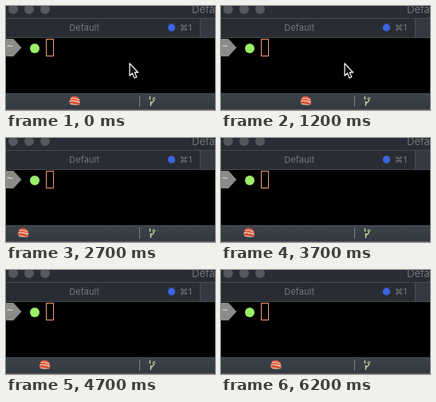
An HTML page that plays this animation: 262 by 130 pixels, repeating every 6.4 s.

```html
<!DOCTYPE html>
<html lang="en">
<head>
<meta charset="utf-8">
<title>Terminal status bar</title>
<style>
  html, body { margin: 0; width: 262px; height: 130px; overflow: hidden; background: #000; }
  svg { display: block; }
  text { font-family: Inter, "DejaVu Sans", sans-serif; font-size: 11px; fill: #74777b; }
</style>
</head>
<body>
<svg width="262" height="130" viewBox="0 0 262 130">
  <defs>
    <linearGradient id="bar" x2="0" y2="1">
      <stop stop-color="#3d434b"/>
      <stop offset="1" stop-color="#32383f"/>
    </linearGradient>
  </defs>

  <!-- title bar and tabs -->
  <rect width="262" height="15" fill="#272c35"/>
  <g fill="#55585d">
    <circle cx="9" cy="4" r="6"/>
    <circle cx="29" cy="4" r="6"/>
    <circle cx="49" cy="4" r="6"/>
  </g>
  <text x="233" y="9" style="font-size:13px">Defa</text>
  <rect y="15" width="262" height="25" fill="#292c32"/>
  <rect x="244" y="15" width="18" height="25" fill="#343941"/>
  <path d="M0 15.5H262M0 39.5H262" stroke="#464a50"/>
  <path d="M243.5 16V39" stroke="#4a4e54"/>
  <text x="79.2" y="31" letter-spacing=".1">Default</text>
  <circle cx="207.5" cy="27" r="4.7" fill="#3b64df"/>
  <text x="217.5" y="31">⌘1</text>

  <!-- prompt -->
  <path d="M0 41H9.3L19.5 52 9.3 63H0Z" fill="#8b8b8b"/>
  <text x="1" y="54" style="font:13px 'DejaVu Sans Mono',monospace;fill:#e2e2e2">~</text>
  <circle cx="36" cy="53" r="6" fill="#9bee68"/>
  <rect x="50.5" y="41.5" width="9" height="21" fill="none" stroke="#f39c72"/>
  <path id="pointer" d="M155 71.7V87.2L158.4 84 161 90 163.8 88.8 161.3 83H165.6Z"
        fill="#080808" stroke="#eee" stroke-width="1.3" stroke-linejoin="round"/>

  <!-- status bar -->
  <rect y="109" width="262" height="21" fill="url(#bar)"/>
  <path d="M0 109.5H262" stroke="#474d54"/>
  <path d="M0 129.5H262" stroke="#665b61"/>
  <path d="M167.5 112V126" stroke="#7b8087"/>
  <g fill="none" stroke="#c3dfa0" stroke-width="1.4">
    <path d="M180.5 113V117M181.5 119V125M181.5 121.5Q185.5 120.5 185.5 116"/>
    <path d="M183.5 116.5L185.5 114 187.3 116.5" stroke-width="1"/>
  </g>
  <!-- two slices over rice, rising to the right -->
  <g id="sushi">
    <path d="M.6 6.5L13 7.5Q14.6 9.5 13 11.2Q7.5 12.5 2 11Q0 9.5 .6 6.5Z" fill="#ead9c0"/>
    <path d="M.3 7.2Q6 6.5 14 9.2Q14 11 12 11.4Q6 10.5 1 9.8Z" fill="#d9503c"/>
    <path d="M1 5.2Q2 1 6 .5Q10 .2 12.5 3.2L14 6.7Q13 8.2 10 7.2Q5.5 5.5 1.2 6.6Z" fill="#df5742"/>
    <path d="M2.3 3.6Q7 2.4 13 5.4M1 6.6Q6 5.4 13.4 8" fill="none" stroke="#f4cfae" stroke-width="1.1"/>
  </g>
</svg>
<script>
  const LOOP = 6400, BEAT = 500, STEP = 6.75;
  const sushi = document.getElementById("sushi");
  const pointer = document.getElementById("pointer");

  function draw(now) {
    const t = now % LOOP;
    const beat = Math.floor((t - 200) / BEAT);
    // The sushi walks one cell per beat and wraps to the left on the fifth.
    const x = beat < 4 ? 85.7 + beat * STEP : 7.7 + (beat - 4) * STEP;
    sushi.setAttribute("transform", `translate(${x} 112)`);
    pointer.setAttribute("visibility", t < 1600 ? "visible" : "hidden");
    requestAnimationFrame(draw);
  }
  draw(performance.now());
</script>
</body>
</html>
```
